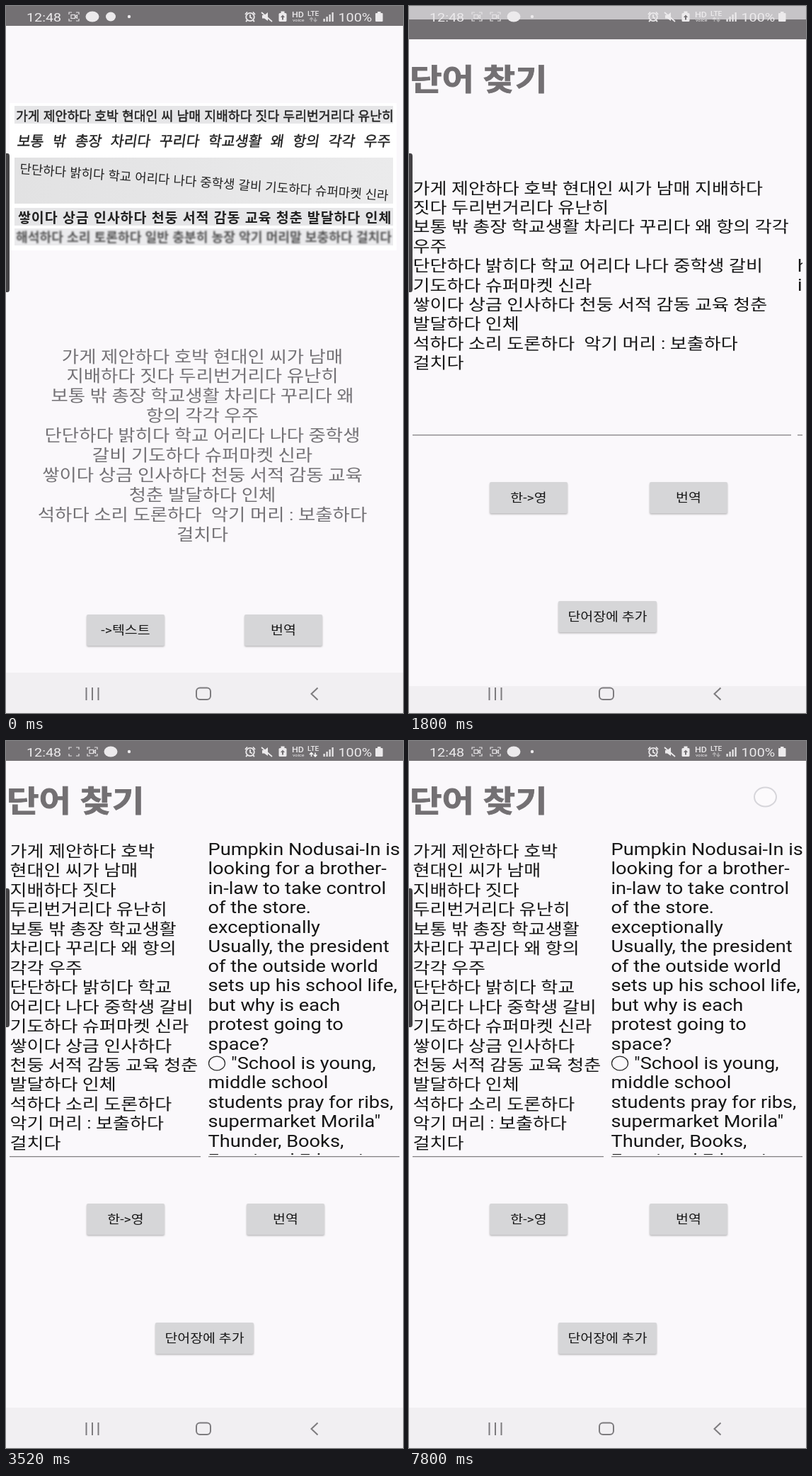
These frames come from a looping animation (561x998 px, 7.84 s). An HTML page:

```html
<!DOCTYPE html>
<html lang="ko">
<head>
<meta charset="utf-8">
<title>단어 찾기</title>
<style>
  html, body { margin: 0; width: 100%; height: 100%; overflow: hidden; background: #faf8fb; }
  svg { display: block; }
  text { font-family: Roboto, "Noto Sans CJK KR", "Noto Sans CJK", sans-serif; white-space: pre; }
  .photo text { font-family: "Noto Sans CJK KR", "Noto Sans CJK", sans-serif; }
</style>
</head>
<body>
<svg id="stage" width="561" height="998" viewBox="0 0 561 998"></svg>
<script>
const LOOP = 7840, STEP = 40;
const WIDE = 1.18; // the screen is shown wider than it is
const BG = '#faf8fb', BAR = '#737073', INK = '#161616', ICON = '#eceaec';

const rect = (x, y, w, h, fill, more = '') =>
  `<rect x="${x}" y="${y}" width="${w}" height="${h}" fill="${fill}" ${more}/>`;
const path = (d, more = '') => `<path d="${d}" ${more}/>`;
const group = (id, body, more = '') => `<g id="${id}" ${more}>${body}</g>`;
const text = (x, y, str, size, fill = INK, more = '') =>
  `<text transform="translate(${x} ${y}) scale(${WIDE} 1)" font-size="${size}" fill="${fill}" ${more}>${str}</text>`;
const lines = (x, y, step, rows, size, fill, more) =>
  rows.map((row, i) => text(x, y + i * step, row, size, fill, more)).join('');
const middle = 'text-anchor="middle"';

const button = (id, x, y, w, label) =>
  rect(x, y + 1.5, w, 44, '#777', 'rx="2" opacity=".5" filter="url(#shade)"') +
  rect(x, y, w, 44, '#d6d6d8', 'rx="2"') +
  rect(x, y, w, 44, '#999', `id="${id}" rx="2" opacity="0"`) +
  text(x + w / 2, y + 28, label, 16.5, INK, middle);

// The bottom bar runs past the screen so that it still covers it when pushed up.
const frameBars = rect(0, 0, 561, 28, BAR) + rect(0, 941, 561, 80, '#f1eff2');

const row = (x, y, str, size, more = '') =>
  `<text x="${x}" y="${y}" font-size="${size}" fill="#222" ${more}>${str}</text>`;
const medium = 'stroke="#222" stroke-width=".4"';

const photo = group('photo',
  rect(5, 137, 547, 208, '#fff') +
  rect(12, 141, 535, 25, '#e6e6e8') +
  row(14, 162, '가게 제안하다 호박 현대인 씨 남매 지배하다 짓다 두리번거리다 유난히', 18.3, medium) +
  `<g transform="translate(15 198) skewX(-8)">${
    row(0, 0, '보통 밖 총장 차리다 꾸리다 학교생활 왜 항의 각각 우주', 20.5, 'word-spacing="6.8" ' + medium)}</g>` +
  rect(12, 214, 535, 65, 'url(#paper)') +
  `<g transform="translate(19 236) rotate(4.2)">${
    row(0, 0, '단단하다 밝히다 학교 어리다 나다 중학생 갈비 기도하다 슈퍼마켓 신라', 17.9)}</g>` +
  rect(12, 285, 535, 25, '#e6e6e8') +
  row(17, 306, '쌓이다 상금 인사하다 천둥 서적 감동 교육 청춘 발달하다 인체', 19.5, 'font-weight="700" letter-spacing=".9"') +
  rect(12, 314, 535, 24, '#ebebed') +
  row(14, 332.5, '해석하다 소리 토론하다 일반 충분히 농장 악기 머리말 보충하다 걸치다', 18.2,
    'font-weight="700" opacity=".75" filter="url(#blur)"'),
  'class="photo"');

const scan = group('scan',
  rect(0, 0, 561, 998, BG) + frameBars + photo +
  lines(277.5, 502.5, 27.9, [
    '가게 제안하다 호박 현대인 씨가 남매', '지배하다 짓다 두리번거리다 유난히',
    '보통 밖 총장 학교생활 차리다 꾸리다 왜', '항의 각각 우주',
    '단단하다 밝히다 학교 어리다 나다 중학생', '갈비 기도하다 슈퍼마켓 신라',
    '쌓이다 상금 인사하다 천둥 서적 감동 교육', '청춘 발달하다 인체',
    '석하다 소리 도론하다  악기 머리 : 보출하다', '걸치다'
  ], 22.4, '#747276', middle) +
  button('press0', 114, 859, 110, '-&gt;텍스트') + button('press1', 337, 859, 110, '번역'));

const rule = (x, w) => rect(x, 586, w, 1.3, '#858385');

const before = group('before',
  lines(5.5, 245.5, 27.4, [
    '가게 제안하다 호박 현대인 씨가 남매 지배하다', '짓다 두리번거리다 유난히',
    '보통 밖 총장 학교생활 차리다 꾸리다 왜 항의 각각', '우주',
    '단단하다 밝히다 학교 어리다 나다 중학생 갈비', '기도하다 슈퍼마켓 신라',
    '쌓이다 상금 인사하다 천둥 서적 감동 교육 청춘', '발달하다 인체',
    '석하다 소리 도론하다  악기 머리 : 보출하다', '걸치다'
  ], 22.1) +
  `<g clip-path="url(#edge)">${lines(549, 355.5, 27.4, ['h', 'i'], 23)}</g>` +
  rule(5, 535) + rule(549, 7));

const after = group('after',
  lines(5.5, 162.8, 27.47, [
    '가게 제안하다 호박', '현대인 씨가 남매', '지배하다 짓다', '두리번거리다 유난히',
    '보통 밖 총장 학교생활', '차리다 꾸리다 왜 항의', '각각 우주', '단단하다 밝히다 학교',
    '어리다 나다 중학생 갈비', '기도하다 슈퍼마켓 신라', '쌓이다 상금 인사하다',
    '천둥 서적 감동 교육 청춘', '발달하다 인체', '석하다 소리 도론하다',
    '악기 머리 : 보출하다', '걸치다'
  ], 22.1) +
  `<g clip-path="url(#field)">${lines(285.5, 161, 27.45, [
    'Pumpkin Nodusai-In is', 'looking for a brother-', 'in-law to take control', 'of the store.',
    'exceptionally', 'Usually, the president', 'of the outside world', 'sets up his school life,',
    'but why is each', 'protest going to', 'space?', '', 'middle school',
    'students pray for ribs,', 'supermarket Morila"', 'Thunder, Books,', 'Emotional Education,'
  ], 23.05)}</g>` +
  '<ellipse cx="298" cy="455" rx="11.5" ry="9.8" fill="none" stroke="#222" stroke-width="1.2"/>' +
  text(318, 463, '"School is young,', 23.05) +
  rule(5, 270) + rule(286, 270), 'opacity="0"');

const finder = group('finder',
  rect(0, 0, 561, 998, BG) + frameBars +
  text(1, 100, '단어 찾기', 42, BAR, `font-weight="900" stroke="${BAR}" stroke-width=".9"`) +
  before + after +
  button('press3', 114, 653, 110, '한-&gt;영') + button('press2', 340, 653, 110, '번역') +
  button('press4', 211, 821, 139, '단어장에 추가'));

const brackets = path('M-7 -3V-6H-3M3 -6H7V-3M7 3V6H3M-3 6H-7V3', 'fill="none" stroke="#e4e2e4" stroke-width="1.2"');
const camera = `<g fill="none" stroke="#e4e2e4" stroke-width="1.2">${
  rect(-4, -2.5, 5.5, 5, 'none') + path('M1.5 0L4.5 -2.2V2.2Z')}</g>`;

const status = group('status',
  text(29, 22, '12:48', 16.7, ICON) +
  group('rec1', brackets + group('blink', camera)) +
  group('rec2', brackets + camera) +
  group('chat', `<ellipse rx="9.5" ry="7.5" fill="${ICON}"/>`) +
  group('blob', `<ellipse rx="7" ry="6.5" fill="${ICON}"/>`) +
  `<circle cx="174" cy="15" r="2.2" fill="${ICON}"/>` +
  // alarm
  `<g fill="none" stroke="${ICON}" stroke-width="1.8"><ellipse cx="345" cy="15.5" rx="5.8" ry="5.6"/>` +
  path('M345 12V16L348 17.5M338 12L341 8.5M352 12L349 8.5M341 20L339 22M349 20L351 22') + '</g>' +
  // muted speaker
  path('M362 13H365L370 9V21L365 17.5H362Z', `fill="${ICON}"`) +
  path('M361 9L376 22', `stroke="${ICON}" stroke-width="1.7"`) +
  // battery saver
  rect(385.5, 10, 11, 12, ICON, 'rx="1.5"') + rect(388.5, 7.5, 5, 3, ICON) +
  path('M391 12.5L394 16H392V19.5H390V16H388Z', `fill="${BAR}"`) +
  text(404, 16, 'HD', 10.5, ICON, 'font-weight="500"') +
  text(405, 22, 'voice', 6, ICON) +
  text(426, 14, 'LTE', 8.5, ICON, 'font-weight="500"') +
  group('data', path('M431.5 22V17.5M429 19L431.5 16.5L434 19M437 16.5V21M434.8 19.5L437 22L439.4 19.5'),
    'fill="none" stroke="#fff" stroke-width="1.5"') +
  [0, 1, 2, 3].map(i => rect(448.5 + i * 4, 18 - i * 3, 2.2, 4 + i * 3, ICON)).join('') +
  text(469.5, 22, '100%', 16.7, ICON) +
  rect(522, 10, 10.5, 12, ICON, 'rx="1"') + rect(525, 8, 4.5, 3, ICON));

const nav = '<g fill="none" stroke="#7d7b7e" stroke-width="2">' +
  path('M113.5 962V980M122 962V980M130.5 962V980') +
  rect(269, 962.5, 20, 16.5, 'none', 'rx="5"') +
  path('M440.5 962.5L431.5 971L440.5 979.5') + '</g>';

const touch = '<ellipse id="touch" rx="15.5" ry="13.5" fill="#fff" fill-opacity=".35" stroke="#d6d5da" stroke-width="2" opacity="0"/>';

const defs = `<defs>
  <filter id="shade" x="-10%" y="-20%" width="120%" height="150%"><feGaussianBlur stdDeviation="1.3"/></filter>
  <filter id="blur" x="-2%" y="-20%" width="104%" height="140%"><feGaussianBlur stdDeviation="1.3"/></filter>
  <linearGradient id="paper"><stop offset="0" stop-color="#e2e2e3"/><stop offset="1" stop-color="#ebebec"/></linearGradient>
  <clipPath id="edge"><rect x="549" y="320" width="7" height="80"/></clipPath>
  <clipPath id="field"><rect x="280" y="130" width="277" height="454"/></clipPath>
</defs>`;

const stage = document.getElementById('stage');
stage.innerHTML = defs + scan + rect(0, 0, 561, 28, '#c6c4c7', 'id="veil" opacity="0"') + finder +
  path('M0 208H2Q5 208 5 212V400Q5 404 2 404H0Z', 'fill="#444245"') + status + nav + touch;

const el = {};
stage.querySelectorAll('[id]').forEach(node => el[node.id] = node);
const fade = (id, value) => el[id].setAttribute('opacity', value);
const move = (id, x, y) => el[id].setAttribute('transform', `translate(${x} ${y})`);

// Linear interpolation through [time, value] steps.
function track(t, keys) {
  if (t <= keys[0][0]) return keys[0][1];
  for (let i = 1; i < keys.length; i++) {
    const [t0, v0] = keys[i - 1], [t1, v1] = keys[i];
    if (t < t1) return v0 + (v1 - v0) * (t - t0) / (t1 - t0);
  }
  return keys[keys.length - 1][1];
}

const RISE = [[1600, 290], [1640, 235], [1680, 168], [1720, 98], [1760, 48], [1800, 19], [1840, 10], [1920, 3], [2000, 0]];
const SHOW = [[1600, 0], [1640, 0.15], [1680, 0.4], [1720, 0.72], [1760, 1]];
const SHIFT = [[1600, 0], [1680, -3], [1800, -12]];
const VEIL = [[1700, 0], [1800, 1]];
const SLIDE = [[80, 0], [200, 9], [320, 22], [400, 26]];
const PRESS1 = [[1280, 0], [1400, 0.3], [1760, 0.3]];
const PRESS2 = [[2920, 0], [3040, 0.3], [3200, 0.3], [3480, 0]];
const TAPS = [
  { x: 404, y: 883, keys: [[1280, 0], [1360, 1], [1440, 1], [1560, 0]] },
  { x: 402, y: 683, keys: [[2920, 0], [3000, 1], [3080, 1], [3200, 0]] },
  { x: 503.5, y: 79, keys: [[7680, 0], [7800, 1]] }
];

function draw(t) {
  const slide = track(t, SLIDE);
  move('rec1', 96, 15);
  fade('rec1', slide / 26);
  fade('blink', t >= 600 && (t - 600) % 1000 < 520 ? 1 : 0);
  move('rec2', 96 + slide, 15);
  move('chat', 122 + slide, 15);
  move('blob', 148 + slide, 15);
  fade('blob', Math.max(0, 1 - slide / 13));
  fade('data', t >= 2000 && t < 5000 ? 1 : 0.4);

  move('scan', 0, track(t, SHIFT));
  fade('veil', track(t, VEIL));
  move('finder', 0, track(t, RISE));
  fade('finder', track(t, SHOW));
  fade('press1', track(t, PRESS1));
  fade('press2', track(t, PRESS2));

  const translated = t >= 3320;
  fade('before', translated ? 0 : 1);
  fade('after', translated ? 1 : 0);

  const tap = TAPS.find(p => track(t, p.keys) > 0);
  fade('touch', tap ? track(t, tap.keys) : 0);
  if (tap) move('touch', tap.x, tap.y);
}

const start = performance.now();
function tick() {
  const t = (performance.now() - start) % LOOP;
  draw(Math.floor(t / STEP) * STEP);
  requestAnimationFrame(tick);
}
draw(0);
requestAnimationFrame(tick);
</script>
</body>
</html>
```
